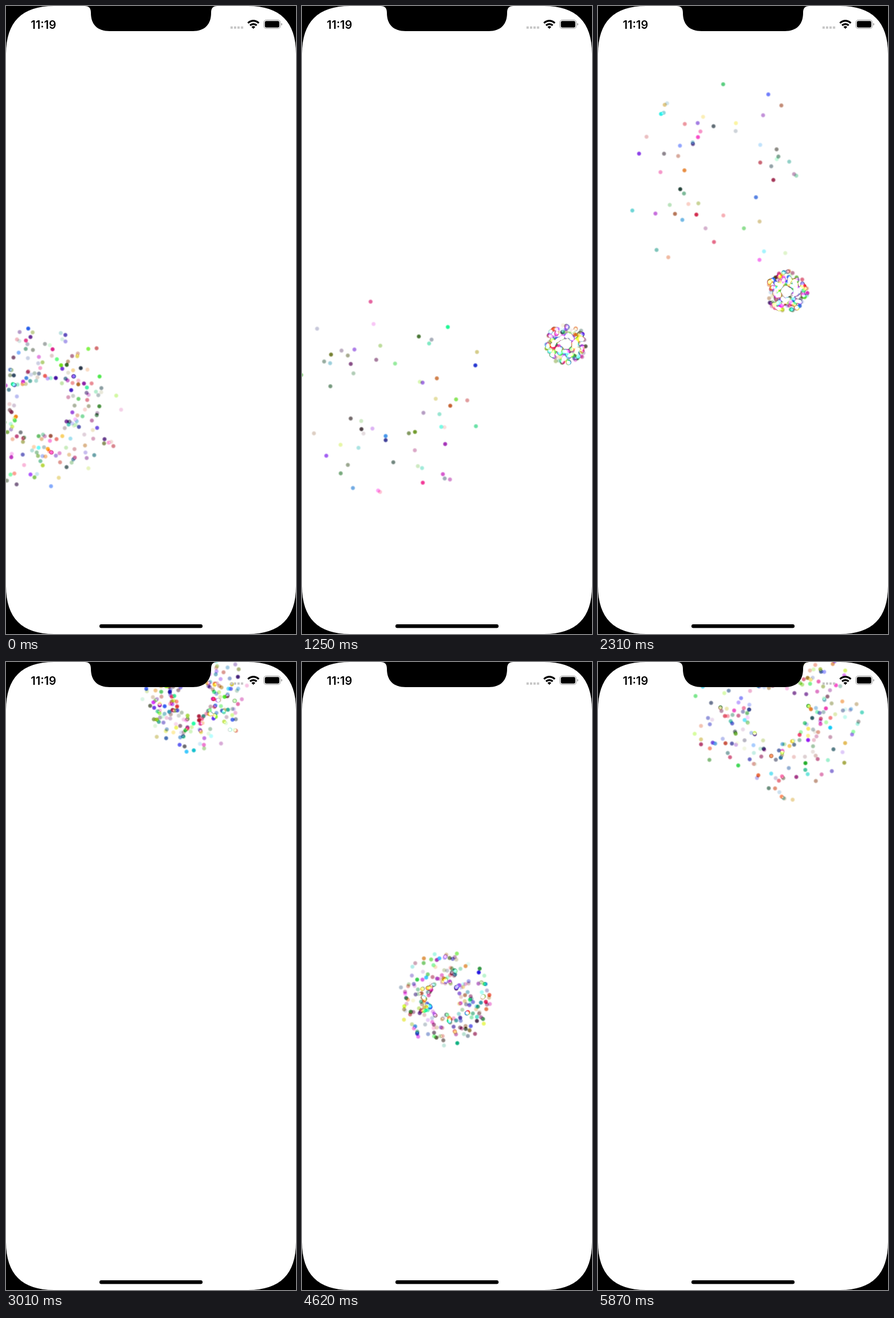
An HTML page with a canvas for the animation above (5.91 s loop, 509x1100 px).

```html
<!DOCTYPE html>
<html lang="en">
<head>
<meta charset="utf-8">
<title>Confetti bursts</title>
<style>
  html, body { margin: 0; width: 100%; height: 100%; overflow: hidden; background: #fff; }
  canvas, svg { position: absolute; left: 0; top: 0; width: 509px; height: 1100px; }
  text { font: 600 20px Inter, "Liberation Sans", sans-serif; }
</style>
</head>
<body>
<canvas id="sky" width="509" height="1100"></canvas>
<svg viewBox="0 0 509 1100">
  <path fill-rule="evenodd" d="M0 0H509V1100H0Z
    M0 84C0 28 28 0 84 0H425C481 0 509 28 509 84V1016C509 1072 481 1100 425 1100H84C28 1100 0 1072 0 1016Z"/>
  <path d="M138 0C146 0 149 4 149 12C149 32 160 44 182 44H328C349 44 360 32 360 12C360 4 363 0 371 0Z"/>
  <text x="43.5" y="39.5">11:19</text>
  <path d="M394 37.8H416.5" stroke="#c6c6c6" stroke-width="4" stroke-dasharray="4 2.1"/>
  <g fill="none" stroke="#000" stroke-width="3.2">
    <path d="M424.7 30A13.2 13.2 0 0 1 443.7 30"/>
    <path d="M428.4 34A8.2 8.2 0 0 1 440 34"/>
  </g>
  <path d="M434.2 40L430.9 36.7A4.7 4.7 0 0 1 437.5 36.7Z"/>
  <rect x="452.5" y="24.5" width="29" height="15" rx="4.2" fill="none" stroke="#999"/>
  <rect x="454.3" y="26.3" width="25.4" height="11.4" rx="2.6"/>
  <path d="M483 29.7Q484.8 30.2 484.8 32T483 34.3Z" fill="#999"/>
  <rect x="164" y="1083" width="181" height="6.5" rx="3.25"/>
</svg>
<script>
const ctx = document.getElementById('sky').getContext('2d');
const LOOP = 5910, FIRST = -437, PERIOD = 530, COUNT = 235;

const centers = [
  [64, 703], [280, 560], [152, 687], [464, 592], [220, 303], [331, 500],
  [331, 64], [170, 545], [306, 58], [250, 590], [231, 499], [315, 95]
];

// The picture advances in steps; each knot opens a run of evenly spaced ones.
const knots = [0, 70, 700, 1320, 1930, 2530, 3160, 3840, 4480, 5140, 5800, LOOP];
const runs = [1, 8, 8, 8, 8, 8, 8, 8, 9, 9, 2];

function seeded(seed) {
  return () => {
    seed = (seed + 0x6D2B79F5) | 0;
    let t = Math.imul(seed ^ (seed >>> 15), 1 | seed);
    t = (t + Math.imul(t ^ (t >>> 7), 61 | t)) ^ t;
    return ((t ^ (t >>> 14)) >>> 0) / 4294967296;
  };
}

function softDot(random) {
  const channel = () => Math.round(random() * 255);
  const rgb = [channel(), channel(), channel()].join();
  const alpha = 0.35 + 0.65 * random();
  const fill = ctx.createRadialGradient(0, 0, 0, 0, 0, 4.6);
  fill.addColorStop(0, `rgba(${rgb},${alpha})`);
  fill.addColorStop(0.5, `rgba(${rgb},${alpha * 0.92})`);
  fill.addColorStop(1, `rgba(${rgb},0)`);
  return fill;
}

const bursts = centers.map(([x, y], i) => {
  const random = seeded(101 + i * 37);
  const dots = Array.from({ length: COUNT }, () => ({
    angle: random() * Math.PI * 2,
    speed: 0.33 + 0.67 * random() ** 1.15,
    life: 475 + 210 * random(),
    fill: softDot(random)
  }));
  return { x, y, born: FIRST + i * PERIOD, dots };
});

function stepTime(t) {
  let i = knots.length - 2;
  while (knots[i] > t) i--;
  const step = (knots[i + 1] - knots[i]) / runs[i];
  return knots[i] + Math.floor((t - knots[i]) / step) * step;
}

function drawBurst({ x, y, born, dots }, time) {
  const age = time - born;
  if (age < 0) return;
  const reach = 0.42 * (age - age * age / 2000);
  for (const { angle, speed, life, fill } of dots) {
    if (age > life) continue;
    const r = reach * speed;
    ctx.setTransform(1, 0, 0, 1, x + r * Math.cos(angle), y + r * Math.sin(angle));
    ctx.fillStyle = fill;
    ctx.fillRect(-5, -5, 10, 10);
  }
}

function render(now) {
  const time = stepTime(now % LOOP);
  ctx.setTransform(1, 0, 0, 1, 0, 0);
  ctx.clearRect(0, 0, 509, 1100);
  // Overlapping dots add up and burn out to white.
  ctx.globalCompositeOperation = 'lighter';
  for (const burst of bursts) drawBurst(burst, time);
}

const start = performance.now();
function tick() {
  render(performance.now() - start);
  requestAnimationFrame(tick);
}
tick();
</script>
</body>
</html>
```
